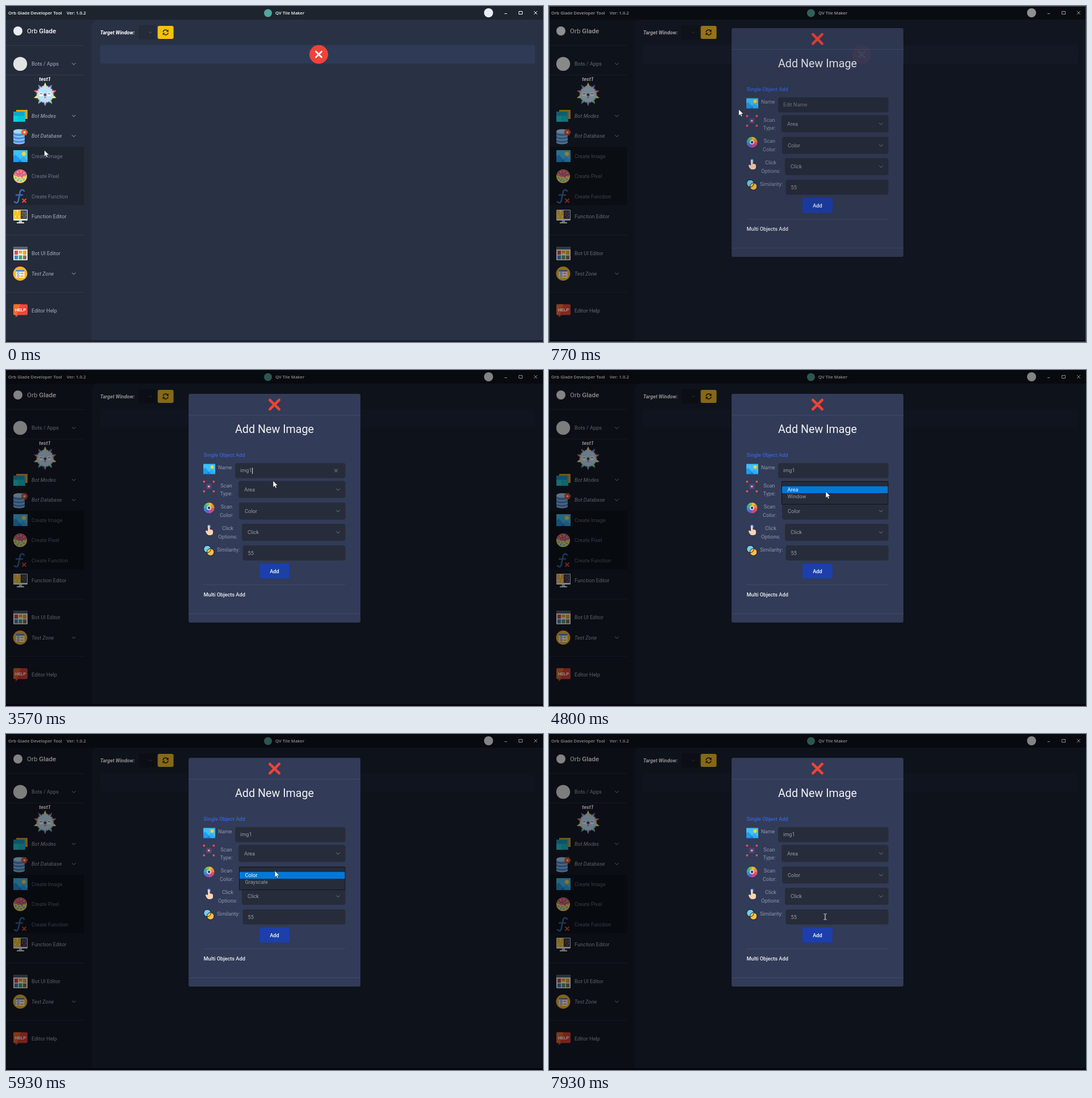
Write an HTML page that moves like this. It is 947 by 592 pixels and loops after 8000 ms.

```html
<!DOCTYPE html>
<html lang="en">
<head>
<meta charset="utf-8">
<title>Add image dialog</title>
<style>
  html, body { margin: 0; width: 100%; height: 100%; overflow: hidden; background: #0f141d; }
  #stage { position: relative; width: 947px; height: 592px; overflow: hidden; }
  #stage > svg { position: absolute; left: 0; top: 0; }
  text { font-family: Roboto, sans-serif; font-size: 9.2px; white-space: pre; }
  .bar { font: 600 7.7px "Open Sans", sans-serif; }
  .i { font-style: italic; }
  .m { font-weight: 500; }
  .b { font-weight: 700; }
</style>
</head>
<body>
<div id="stage">
  <svg id="app" width="947" height="592"></svg>
  <svg id="top" width="947" height="592"></svg>
</div>
<script>
const LOOP = 8000;
const $ = id => document.getElementById(id);

// Drawing helpers; text is placed by its vertical middle.
const rect = (x, y, w, h, fill, r = 0, more = '') =>
  `<rect x="${x}" y="${y}" width="${w}" height="${h}" rx="${r}" fill="${fill}" ${more}/>`;
const disc = (x, y, r, fill, more = '') => `<circle cx="${x}" cy="${y}" r="${r}" fill="${fill}" ${more}/>`;
const path = (d, fill, more = '') => `<path d="${d}" fill="${fill}" ${more}/>`;
const line = (d, color, w = 1, more = '') =>
  path(d, 'none', `stroke="${color}" stroke-width="${w}" ${more}`);
const text = (x, y, s, fill, cls = '', more = '') =>
  `<text x="${x}" y="${y + 3.3}" fill="${fill}" class="${cls}" ${more}>${s}</text>`;
const mid = 'text-anchor="middle"';
const chevron = (x, y, color) => line(`M${x - 3.2} ${y - 1.6}l3.2 3.2 3.2-3.2`, color);
const cross = (x, y, r, color, w) =>
  line(`M${x - r} ${y - r}l${2 * r} ${2 * r}m0 ${-2 * r}l${-2 * r} ${2 * r}`, color, w, 'stroke-linecap="round"');
const at = (x, y, body, scale = 1) => `<g transform="translate(${x} ${y}) scale(${scale})">${body}</g>`;
const ring = (n, f) => Array.from({ length: n }, (_, i) => f(i, i * 2 * Math.PI / n)).join('');

// Icons, each about 25 px wide from its own top left corner.
const picture = rect(0, 0, 25, 21, '#3fc0f7') + path('M0 21V11L4 8 17 21z', '#1f9cf0') +
  path('M7 21l10-9 8 7v2z', '#1583e0') + path('M12 17l5-5 8 7v2H16z', '#36a9f4') + disc(18.5, 6.5, 3.6, '#ffd43b');

const windows = path('M5 0h20v16h-4V4H5z', '#f59b14') + rect(0, 3, 21, 18, '#00bcd4') +
  rect(0, 3, 19, 7, '#12a5c9') + rect(0, 11, 9, 10, '#00d4de') + rect(10, 11, 9, 10, '#08c5d4');

const database = path('M0 4v17c0 5 20 5 20 0V4z', '#4a90e0') +
  [3, 9, 15, 21].map(y => path(`M0 ${y}c0 4 20 4 20 0v2.600c0 4-20 4-20 0z`, '#8bc3f5')).join('') +
  `<ellipse cx="10" cy="3.500" rx="10" ry="3.500" fill="#a9d5fb"/>` +
  disc(19.5, 5.5, 5, '#ef5a35', 'stroke="#ef5a35" stroke-dasharray="2 2" stroke-width="2"') +
  disc(19.5, 5.5, 2, '#ffd9a8');

const pixels = disc(12, 12, 12, '#f2d75c') +
  path('M.500 9A12 12 0 0 1 23.500 9Q21 14 18 11 15 16 12 12 8 15 6 11 3 13 .500 9z', '#e8578e') +
  ring(9, (i, a) => disc(12 + 8.5 * Math.cos(a), 12 + 8.5 * Math.sin(a), 1.5, Math.sin(a) > 0.1 ? '#3cc4d8' : '#f6b04c')) +
  ring(4, (i, a) => disc(12 + 4 * Math.cos(a + 0.5), 13 + 4 * Math.sin(a + 0.5), 1.3, '#4fc7c0'));

const func = line('M19 3C16-1 12 1 11.500 6L9 19C8 24 5 25 2 22M5 10h11', '#3a6fb8', 2.6, 'stroke-linecap="round"') +
  cross(19, 20, 2.8, '#f04438', 2.2);

const monitor = rect(0, 0, 25, 19, '#e4e8ee', 1) + rect(1, 1, 12, 15, '#fbbf1a') + rect(13, 1, 11, 15, '#3a4256') +
  text(7, 5, '!', '#fff', 'b', mid) + line('M5 10l-2 2 2 2m4-4l2 2-2 2', '#fff') +
  line('M15 4h4m-2 3h5m-7 3h3m-1 3h5', '#ef6a55') + line('M20 4h3m-8 3h1m4 3h3', '#4db6e8') +
  path('M10 19h5l1 4h-7z', '#aab4c2') + rect(6, 22, 13, 2, '#dbe1e8');

const layout = rect(0, 0, 25, 24, '#eef1f5', 1) + rect(0, 0, 25, 5, '#5b6472', 1) +
  ['#e84a3c', '#f6a723', '#f6a723', '#3a86d8', '#43a85a', '#8d6e63'].map((c, i) =>
    rect(2 + i % 3 * 7.5, 7 + (i > 2) * 8.5, 6, i === 1 ? 5 : 7, c)).join('');

const checks = disc(12.5, 12.5, 12.5, '#fbb81c') + rect(5, 6, 15, 14, '#f3f6fa', 1) + rect(5, 6, 15, 3, '#4b8fdf') +
  disc(9, 12, 1.8, 'none', 'stroke="#3a86d8"') + disc(9, 17, 1.8, 'none', 'stroke="#e5533d"') +
  line('M13 12h5m-5 5h5', '#f2a41b', 2);

const help = path('M2 0H23Q25 0 25 2V17Q25 19 23 19H9L4 23V19H2Q0 19 0 17V2Q0 0 2 0z', '#f1473b') +
  path('M0 2Q0 0 2 0H13L6 19H2Q0 19 0 17z', '#fb6b2d') +
  text(12.5, 9.5, 'HELP', '#fff', 'b', mid + ' style="font-size:8px"');

const spikes = ['#f2716b', '#f6e27a', '#7ccf9d', '#a78bd4', '#6ec3b8', '#f6e27a', '#f2716b', '#8f78c8', '#f6e27a', '#8f78c8'];
const mascot = ring(10, (i, a) =>
    `<path d="M10-5L21 0 10 5z" fill="${spikes[i]}" transform="rotate(${a * 57.296 - 18})"/>`) +
  path(ring(40, (i, a) => {
    const r = i % 2 ? 13 : 16;
    return `${i ? 'L' : 'M'}${(r * Math.cos(a)).toFixed(1)} ${(r * Math.sin(a)).toFixed(1)}`;
  }) + 'z', '#bde1f7') +
  disc(-7, 0, 3.6, '#f6fbff') + disc(7, 0, 3.6, '#f6fbff') +
  line('M-9 0q2-3 4 0M5 0q2-3 4 0', '#4a5262', 1.2) + disc(0, 1, 2.4, '#4a5262') + disc(0, 5.5, 1.6, '#e27a88');

const scan = [[0, 0], [17, 0], [0, 17], [17, 17]].map(([x, y]) => rect(x, y, 3.6, 3.6, '#e8505b', 1)).join('') +
  rect(5.5, 5.5, 9.5, 9.5, '#55446f', 1) + disc(10.2, 10.2, 1.8, '#f6a5b5') +
  line('M7 1h1m4 0h1M1 7v1m0 4v1', '#6b5577');

const hues = ['#f2b63c', '#ec8a3e', '#e8505b', '#c04a9a', '#7a55c7', '#3f86d9', '#35b1a0', '#7cc04b'];
const wheel = ring(8, (i, a) => path('M0 0L9.500 0A9.500 9.500 0 0 1 6.720 6.720z', hues[i],
  `transform="rotate(${a * 57.296 - 90})"`)) + disc(0, 0, 3.8, '#eef0f5') + disc(0, 0, 2.4, '#3a4466');

const hand = disc(7, 4.5, 3.2, '#2f6fc4') +
  path('M5 4Q7 1 8.500 4V10Q14 10 14 13V17Q13 20 9 20H6Q2 18 1 13 1 11 3 12L5 13z', '#fbd3b4');

const overlap = disc(7, 7, 6.3, '#6fd0ee', 'stroke="#151a26"') + disc(12.6, 12.4, 6.3, '#f8c04a', 'stroke="#151a26"') +
  line('M7 13.300A6.300 6.300 0 0 0 13.300 7', '#151a26');

// Main window
const label = '#a9b1c0', faint = '#6d7586', rule = '#333b4b';
const items = [
  [102, 'Bots / Apps', '', 1], [193.5, 'Bot Modes', 'i', 1], [229, 'Bot Database', 'i', 1],
  [264.5, 'Create Image', '', 0, faint], [300, 'Create Pixel', '', 0, faint], [335.5, 'Create Function', '', 0, faint],
  [371, 'Function Editor', '', 0], [436, 'Bot UI Editor', '', 0], [471.5, 'Test Zone', 'i', 1], [536.5, 'Editor Help', '', 0]
];
$('app').innerHTML =
  rect(0, 0, 947, 592, '#242b3a') + rect(0, 0, 947, 24, '#1d242e') +
  path('M151 592V38Q151 24 165 24H947V592z', '#293144') + rect(0, 589, 947, 3, '#1d1b28') +
  text(4, 11.5, 'Orb Glade Developer Tool', '#fff', 'bar') + text(107, 11.5, 'Ver: 1.0.2', '#fff', 'bar') +
  disc(462, 12.5, 7, '#4fa79d') + text(475, 11.5, 'QV Tile Maker', '#fff', 'bar') +
  disc(851, 12, 8, '#e9edf3') +
  line('M879 13.500h4.500', '#fff') + line('M904.500 9.500h6v5h-6z', '#fff') + cross(934, 12, 2.6, '#fff', 1) +
  disc(21, 44, 8, '#e9edf3') +
  `<text x="37" y="48" fill="#fff" style="font-size:11.600px">Orb <tspan class="m">Glade</tspan></text>` +
  line('M0 69.500h138M0 121.500h138M0 403.500h138M0 504.500h138', rule) +
  rect(0, 248, 138, 103, '#1e2530', 4) +
  items.map(([y, s, cls, more, color]) =>
    text(45, y, s, color || label, cls) + (more ? chevron(119.5, y, label) : '')).join('') +
  text(68.5, 128.5, 'test1', '#fff', 'b i', mid) +
  disc(25, 102, 12.2, '#e2e3e4') + at(69, 155.5, mascot) +
  at(13, 183, windows) + at(13, 217, database) + at(13, 254, picture) + at(13, 288, pixels) + at(13, 323, func) +
  at(13, 359, monitor) + at(13, 424, layout) + at(12.5, 459, checks) + at(13, 525.5, help) +
  text(166, 46.8, 'Target Window:', '#fff', 'b i', 'style="font-size:9px"') +
  rect(234, 34, 31, 25, '#242b39', 3) + chevron(254.5, 46.5, '#566073') +
  rect(267.5, 35, 28, 23, '#ffc107', 3) +
  line('M277 46a4.500 4.500 0 0 1 8.200-2m.800 3a4.500 4.500 0 0 1-8.200 2', '#222', 1.3) +
  path('M286.500 41.500v4h-4zM276.500 51.500v-4h4z', '#222') +
  rect(166, 68.5, 767, 33, '#2f3a56', 4, 'id="strip"') +
  disc(551.5, 85.3, 16.5, '#f44336') + cross(551.5, 85.3, 5, '#fff', 2.8);

// Dialog
const field = '#262c3a', value = '#949cab', hint = '#8f98ab';
const input = (x, y, h) => rect(x, y, 598.5 - x, h, field, 4);
const select = (x, y, s) => input(x, y, 30) + text(x + 10, y + 15, s, value) + chevron(585.5, y + 15, '#77809a');
const pair = (x, y, a, b) => text(x, y, a, hint, '', mid) + text(x, y + 14.5, b, hint, '', mid);
const menu = (id, x, y, first, second) =>
  `<svg id="${id}" x="${x}" y="${y}" width="${598.5 - x}" height="41" display="none">` +
  rect(0.5, 0.5, 597.5 - x, 40, field, 0, 'stroke="#11141b" class="frame"') +
  rect(1, 9, 596.5 - x, 12, '#0078d7') + text(10.5, 15, first, '#fff') + text(10.5, 26.5, second, value) + '</svg>';

$('top').innerHTML =
  '<g id="dialog">' + rect(322, 42, 303, 403, '#323b57', 3) +
  line('M322 79.500h303M322 429.500h303M348 378.500h250', '#424c68') + cross(473.5, 61, 8.2, '#f44336', 4.6) +
  `<text x="473.500" y="111" fill="#f3f4f7" text-anchor="middle" style="font-size:19.700px">Add New Image</text>` +
  text(348.5, 149.5, 'Single Object Add', '#3465dc', 'm') +
  at(348, 165.5, picture, 0.84) + text(374, 171.5, 'Name', hint) + input(404, 164, 26.5) +
  text(413, 177, '', value, '', 'id="name"') +
  '<g id="clear">' + cross(582, 177.3, 2.6, '#8d96a9', 1) + '</g>' +
  '<rect id="caret" y="172" width="1" height="11" fill="#e6e8ee"/>' +
  at(347.5, 195, scan) + pair(388.5, 203.5, 'Scan', 'Type:') + select(410, 195.5, 'Area') +
  at(358, 243, wheel) + pair(389, 241, 'Scan', 'Color:') + select(411, 233.5, 'Color') +
  at(351, 271, hand) + pair(391, 278.7, 'Click', 'Options:') + select(416, 271, 'Click') +
  at(348, 308.5, overlap) + text(372, 316.5, 'Similarity:', hint) + input(417.5, 309, 26.5) +
  text(426.5, 322.5, '55', value) +
  rect(447, 341, 53, 26.5, '#1c3fab', 3) + text(473.5, 354.2, 'Add', '#fff', 'm', mid) +
  text(348.5, 396, 'Multi Objects Add', '#f0f2f6', 'm') +
  menu('type', 410, 196, 'Area', 'Window') + menu('color', 411, 234, 'Color', 'Grayscale') +
  menu('click', 416, 271.5, 'Click', 'No Click') + '</g>' +
  rect(0.5, 0.5, 946, 591, 'none', 0, 'id="focus" stroke="#85888e" stroke-dasharray="1 1"') +
  '<g id="pointer">' + path('M0 0V11.500L2.700 9 4.500 13 6.400 12.200 4.700 8.300H8.300z', '#fff', 'stroke="#111" stroke-width=".6"') +
  '</g><g id="beam">' + line('M-2.500-5h2M.5-5h2M0-4.500v9.500M-2.500 5h2M.5 5h2', '#f2f3f5') + '</g>';

// Pointer path: time, x, y
const track = [
  [0, 67.5, 254], [70, 67.5, 254], [100, 70, 259], [400, 70, 259], [570, 185, 224], [770, 334, 182],
  [940, 425, 176], [1100, 462, 178], [3230, 462, 178], [3570, 471, 195], [3800, 469, 234], [4000, 465, 253],
  [4090, 466, 253], [4300, 480, 228], [4480, 488, 214], [5040, 488, 214], [5300, 481, 233], [5520, 475, 252],
  [5710, 474, 241], [6340, 474, 241], [6540, 479, 270], [6710, 481, 283], [7460, 481, 283], [7700, 485, 308],
  [7920, 487, 322], [8000, 487, 322]
];
const typed = [[2300, 'i'], [2530, 'im'], [2870, 'img'], [3230, 'img1']];
// Menus: opening time, first height, time fully open, closing time
const menus = { type: [4600, 8, 4780, 5010], color: [5720, 11, 5900, 6380], click: [6865, 28, 7020, 7480] };

const clamp = v => Math.min(1, Math.max(0, v));
const show = (id, on) => $(id).setAttribute('display', on ? 'inline' : 'none');
const move = (id, x, y) => $(id).setAttribute('transform', `translate(${x} ${y})`);

function spot(t) {
  const i = Math.max(1, track.findIndex(p => p[0] > t));
  const [a, b] = [track[i - 1], track[i]], k = (t - a[0]) / (b[0] - a[0]);
  return [a[1] + (b[1] - a[1]) * k, a[2] + (b[2] - a[2]) * k];
}

function draw(t) {
  const open = 1 - (1 - clamp((t - 570) / 300)) ** 2;
  $('app').style.filter = open
    ? `brightness(${1 - 0.45 * open}) contrast(${1 + 0.09 * open}) saturate(${1 - 0.2 * open})` : 'none';
  $('strip').setAttribute('opacity', 1 - 0.6 * open);
  $('dialog').setAttribute('opacity', open);
  move('dialog', 0, -27 * (1 - open));
  show('focus', t >= 570 && t < 1240);

  const word = typed.filter(s => t >= s[0]).map(s => s[1]).pop();
  const name = $('name');
  name.textContent = word || 'Edit Name';
  name.setAttribute('fill', word ? value : '#737c8e');
  $('caret').setAttribute('x', word ? 413.5 + name.getComputedTextLength() : 413);
  $('caret').setAttribute('opacity', word ? 1 : 1 - clamp((t - 1760) / 200));
  show('caret', t >= 1240 && t < 4560);
  show('clear', word && t < 4560);

  for (const [id, [from, h0, full, close]] of Object.entries(menus)) {
    const h = h0 + (41 - h0) * clamp((t - from) / (full - from));
    show(id, t >= from && t < close);
    $(id).setAttribute('height', h);
    $(id).querySelector('.frame').setAttribute('height', h - 1);
  }

  const [x, y] = spot(t);
  const beam = open > 0.5 && x > 404 && (y > 164 && y < 190 || y > 309);
  show('pointer', !beam);
  show('beam', beam);
  move(beam ? 'beam' : 'pointer', x, y);
}

const start = performance.now();
function tick() {
  draw((performance.now() - start) % LOOP);
  requestAnimationFrame(tick);
}
tick();
</script>
</body>
</html>
```
